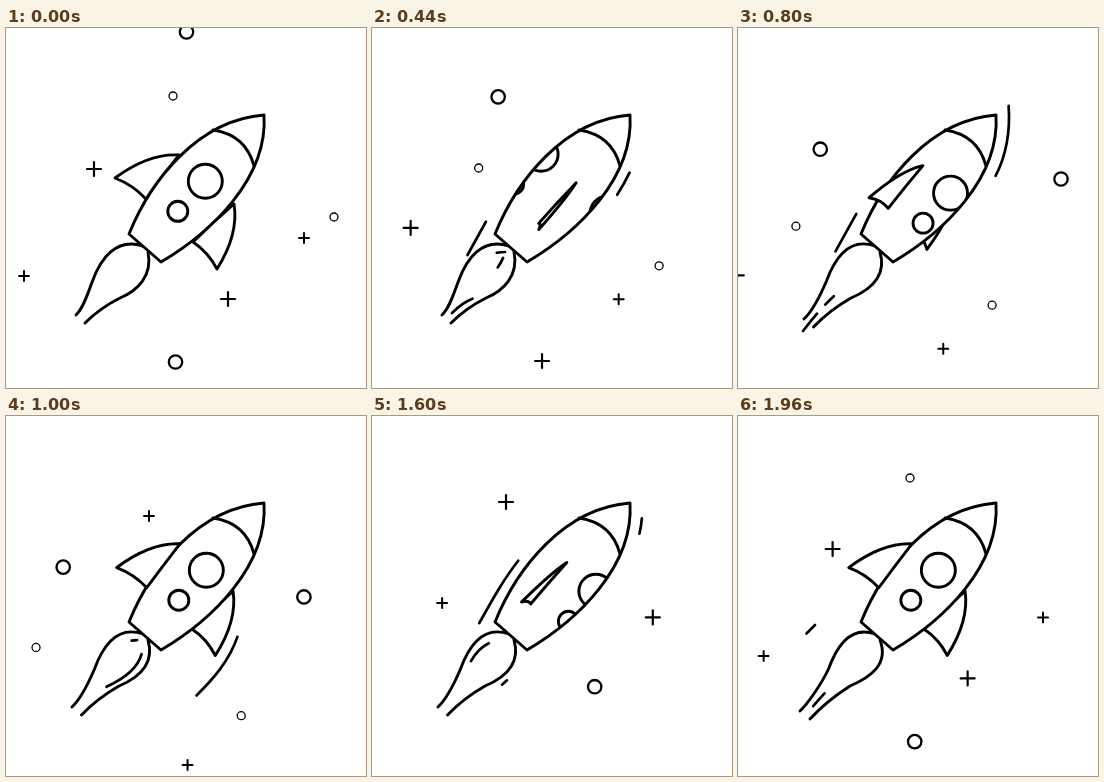
Animation, 360 px wide and 360 px high, one loop 2 s. Source, as an HTML page:

```html
<!DOCTYPE html>
<html lang="en">
<head>
<meta charset="utf-8">
<title>Rocket</title>
<style>
  html, body { margin: 0; width: 100%; height: 100%; overflow: hidden; background: #fff; }
  svg { display: block; width: 100vw; height: 100vh; }
  .ink { fill: none; stroke: #000; stroke-width: 2.9; stroke-linecap: round; stroke-linejoin: round; }
  .solid { fill: #fff; }
  .streak { stroke-width: 2.7; }
  .ring { stroke-width: 2.3; }
  .dot { stroke-width: 1.3; }
  .plus { stroke-width: 2.2; }
  .cross { stroke-width: 2; }
</style>
</head>
<body>
<svg viewBox="0 0 360 360">
  <defs>
    <path id="hull" d="M123 206C145 152 192 92 258 87C262 150 206 204 155 234Z"/>
    <clipPath id="inside"><use href="#hull"/></clipPath>
  </defs>
  <g id="sky"></g>
  <g id="streaks"></g>
  <path id="flame" class="ink"/>
  <path id="backFin" class="ink solid"/>
  <use href="#hull" fill="#fff"/>
  <g id="windows" clip-path="url(#inside)"></g>
  <use href="#hull" class="ink"/>
  <path class="ink" d="M207 102Q240 107 248 138"/>
  <path id="frontFin" class="ink solid"/>
</svg>
<script>
const LOOP = 2000, HOLD = 40;
const $ = id => document.getElementById(id);

function add(parent, tag, attrs) {
  const el = document.createElementNS('http://www.w3.org/2000/svg', tag);
  for (const key in attrs) el.setAttribute(key, attrs[key]);
  return parent.appendChild(el);
}
const show = (el, on) => el.setAttribute('visibility', on ? 'visible' : 'hidden');

// Sky: kind, tick, x and y at that tick, fall per tick, first visible tick
const sky = [
  ['ring', 0, 180.5, 4, 2.494, 0],
  ['ring', 0, 169.5, 334, 2.494, 0],
  ['ring', 47, 323, 151, 2.494, 40],
  ['dot', 0, 167, 68, 2.77, 0],
  ['dot', 0, 328, 189, 1.876, 0],
  ['dot', 117, 172, 62, 2, 103],
  ['plus', 0, 88, 141, 2.265, 0],
  ['plus', 0, 222, 271, 2.385, 0],
  ['plus', 79, 318, 157, 2.775, 69],
  ['plus', 95, 134, 86, 2.136, 80],
  ['cross', 0, 18, 248, 2.4, 0],
  ['cross', 0, 298, 210, 2.355, 0],
  ['cross', 59, 143, 100, 2.415, 50],
  ['cross', 117, 305, 201.5, 2.36, 99]
].map(([kind, tick, x, y, fall, from]) => {
  const size = { ring: 6.7, dot: 4, plus: 7, cross: 5 }[kind];
  const round = kind === 'ring' || kind === 'dot';
  const el = round
    ? add($('sky'), 'circle', { class: 'ink ' + kind, r: size })
    : add($('sky'), 'path', { class: 'ink ' + kind, d: `M${-size} 0H${size}M0 ${-size}V${size}` });
  return { el, tick, x, y, fall, from };
});

// Streaks: path, then runs of tick, tail, head, tail speed, head speed (in % of the path)
const streaks = [
  ['M300 44C288 56 282 68 272 72C258 77 240 75 225 81C190 93 165 118 146 145C128 168 116 192 96 227',
    [79, 12, 30.5, 3.4, 3.85]],
  ['M146 141C131 162 116 190 95.5 227', [26, 62, 100, 10, 10], [47, 53, 96, 10, 10]],
  ['M268 56C272 80 275 115 257 149C244 176 241 196 232 219C224 244 208 262 190 280',
    [47, 9, 38.5, 5.1, 5.1]],
  ['M270 100C269 120 261 142 245 167C236 180 228 190 215 204',
    [26, 39, 60, 4, 4], [79, 58, 83, 5, 5], [95, 2, 15, 5, 5]],
  ['M93 182L43 237', [79, 40, 58, 4, 4]],
  ['M97 189L47 239', [117, 40, 57, 4, 4]],
  ['M150 251L115 282', [95, 43, 57, 4, 4]],
  ['M133 224C110 224 100 240 93 258C88 270 83 282 78 290',
    [26, 0, 9, 5, 5], [59, 2, 8, 3.6, 4.5], [95, 18, 46, 5, 5]],
  ['M132 228C126 242 118 250 96 268C85 278 75 290 65 303',
    [26, 2, 13, 5, 5], [47, 54, 66, 5, 5], [47, 78, 100, 5, 5], [117, 67, 84, 4, 4]],
  ['M136 226C139 244 126 259 100 271C92 274 87 278 80 285',
    [26, 71, 100, 5, 5], [59, 14, 71, 6.5, 6.5], [79, 0, 30, 7, 7]]
].flatMap(([d, ...runs]) => runs.map(run => ({
  el: add($('streaks'), 'path', { class: 'ink streak', d, pathLength: 100 }), run
})));

// Portholes: two sets slide across the hull one behind the other
const GAP = 88.5;
const portholes = [0, GAP].flatMap(lead => [[199.3, 153.3, 17], [171.8, 183.3, 10]].map(([x, y, r]) => ({
  el: add($('windows'), 'circle', { class: 'ink', r }), x, y, lead
})));

// Fin outline on the right and on the left edge of the hull
const finRight = [[228, 176], [233, 206], [211, 241], [202, 224], [187, 214], [207.5, 194]];
const finLeft = [[173, 127], [143, 125], [109, 150], [127, 157], [140, 171], [156, 149]];

function finPath(t) {
  const [apex, c1, tip, c2, root, c3] = finRight.map(([x, y], i) =>
    [x + (finLeft[i][0] - x) * t, y + (finLeft[i][1] - y) * t].map(v => v.toFixed(2)).join(' '));
  return `M${apex}Q${c1} ${tip}Q${c2} ${root}Q${c3} ${apex}Z`;
}

function flamePath(s) {
  const e = 4 * s, w = 2 * s;
  return `M137 218C${110 + s} 209 ${94.5 + w} 231 ${86.5 + w} 253` +
    `C${81.5 + s} ${266 + s} ${77.5 - e} ${280 + e} ${70 - e} ${287 + e}` +
    `M142 224C${147 + w} 248 ${131 + s} ${263 - s} ${114 - s} 270` +
    `C${100 - s} ${277 + s} ${90 - e} ${284 + e} ${79 - 3.5 * s} ${295 + e}`;
}

function draw(tick) {
  for (const { el, tick: at, x, y, fall, from } of sky) {
    const dy = (tick - at) * fall;
    el.setAttribute('transform', `translate(${x - dy * 0.838} ${y + dy})`);
    show(el, tick >= from);
  }

  for (const { el, run: [at, tail, head, tailSpeed, headSpeed] } of streaks) {
    const a = Math.max(0, tail + (tick - at) * tailSpeed);
    const b = Math.min(100, head + (tick - at) * headSpeed);
    show(el, b > a);
    if (b > a) {
      el.setAttribute('stroke-dasharray', `${b - a} 300`);
      el.setAttribute('stroke-dashoffset', -a);
    }
  }

  // The second half turn is slightly quicker
  const turn = tick < 60 ? tick / 60 : (tick - 60) / 58;
  const slide = turn + 0.025 * Math.sin(Math.PI * turn);
  for (const { el, x, y, lead } of portholes) {
    const u = lead - slide * GAP;
    el.setAttribute('cx', x + u * 0.745);
    el.setAttribute('cy', y + u * 0.667);
  }
  $('frontFin').setAttribute('d', finPath(turn));
  $('backFin').setAttribute('d', finPath(1 - turn));

  const beat = Math.floor(Math.max(0, tick - 1) / 3) % 4;
  $('flame').setAttribute('d', flamePath([0, 1, 2, 1][beat]));
}

// The motion runs in 60 ticks a second, shown every 40 ms
const start = performance.now();
function frame() {
  const step = Math.floor(((performance.now() - start) % LOOP) / HOLD);
  draw(Math.max(0, Math.ceil(step * 12 / 5) - 1));
  requestAnimationFrame(frame);
}
frame();
</script>
</body>
</html>
```
